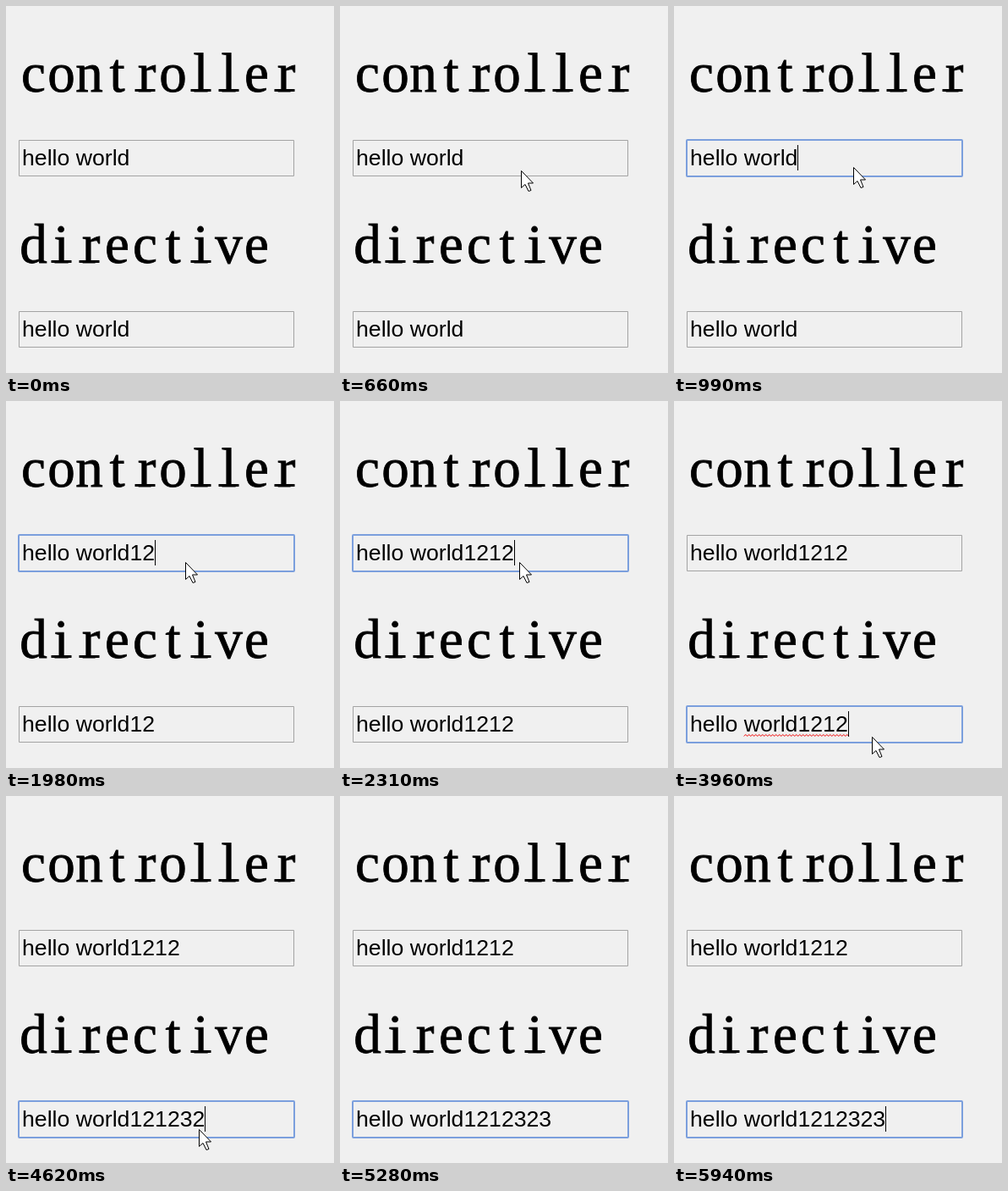
These frames come from a looping animation (388 px wide and 433 px high, 6270 ms). An HTML page with a canvas:

```html
<!DOCTYPE html>
<html lang="en">
<head>
<meta charset="utf-8">
<title>Two linked inputs</title>
<style>
  html, body { margin: 0; width: 100%; height: 100%; overflow: hidden; background: #f0f0f0; }
  canvas { display: block; }
</style>
</head>
<body>
<canvas id="stage" width="388" height="433"></canvas>
<script>
const ctx = document.getElementById('stage').getContext('2d');
const STEP = 330, STEPS = 19;
const FIELD_GAP = 202, TEXT_X = 19, CELL = 33, HEADING_Y = 101;

// Each entry is [first step, value]; the value holds until the next entry.
const pointer = [[0, null], [1, [299, 206]], [2, [214, 194]], [3, [212, 190]], [11, [247, 303]],
  [12, [234, 396]], [13, [232, 395]], [14, [228, 393]], [15, [217, 389]], [16, null]];
const focus = [[0, -1], [3, 0], [12, 1]];
const caret = [[0, false], [3, true], [8, false], [10, true], [16, false], [18, true]];
const topDigits = [[0, ''], [4, '1'], [6, '12'], [7, '1212']];
const extraDigits = [[0, ''], [13, '3'], [14, '32'], [15, '323']];
const SPELLCHECK_STEP = 12;

const at = (track, step) => track.filter(([start]) => start <= step).pop()[1];

// Monospaced serif lettering; narrow letters get a wide foot.
function heading(text, baseline) {
  ctx.font = '65px "Liberation Serif", "Times New Roman", serif';
  ctx.textAlign = 'center';
  ctx.fillStyle = ctx.strokeStyle = '#000';
  ctx.lineWidth = 0.8;
  [...text].forEach((letter, i) => {
    const x = 32.5 + CELL * i;
    const shift = letter === 'r' ? 2 : 0;
    ctx.fillText(letter, x + shift, baseline);
    ctx.strokeText(letter, x + shift, baseline);
    if ('lir'.includes(letter)) ctx.fillRect(x - 12, baseline - 3, 24, 3);
  });
}

function squiggle(x, end, y) {
  ctx.beginPath();
  ctx.moveTo(x, y + 2);
  for (let up = true; x < end; up = !up) ctx.lineTo(x += 2, up ? y : y + 2);
  ctx.strokeStyle = '#f00000';
  ctx.lineWidth = 1;
  ctx.stroke();
}

function field(index, text, focused, showCaret, misspelled) {
  ctx.save();
  ctx.translate(0, index * FIELD_GAP);
  ctx.beginPath();
  if (focused) {
    ctx.roundRect(15, 158, 326, 43, 1);
    ctx.strokeStyle = '#7b9fdd';
    ctx.lineWidth = 2;
  } else {
    ctx.rect(15.5, 158.5, 325, 42);
    ctx.strokeStyle = '#a3a3a3';
    ctx.lineWidth = 1;
  }
  ctx.stroke();
  ctx.font = '26.667px "Liberation Sans", Arial, sans-serif';
  ctx.textAlign = 'left';
  ctx.fillStyle = '#000';
  ctx.fillText(text, TEXT_X, 188);
  const end = Math.round(TEXT_X + ctx.measureText(text).width);
  if (misspelled) squiggle(TEXT_X + ctx.measureText('hello ').width, end - 1, 191.5);
  if (focused && showCaret) ctx.fillRect(end, 164, 1, 30);
  ctx.restore();
}

function arrow([x, y]) {
  ctx.save();
  ctx.translate(x + .5, y + .5);
  const outline = new Path2D('M0 0V20L4.5 16L8.5 24L11.5 23L8 14.5H14Z');
  ctx.fillStyle = '#fff';
  ctx.fill(outline);
  ctx.strokeStyle = '#000';
  ctx.lineWidth = 1;
  ctx.stroke(outline);
  ctx.restore();
}

function draw(now) {
  const step = Math.floor(now / STEP) % STEPS;
  ctx.fillStyle = '#f0f0f0';
  ctx.fillRect(0, 0, 388, 433);
  heading('controller', HEADING_Y);
  heading('directive', HEADING_Y + FIELD_GAP);

  const topText = 'hello world' + at(topDigits, step);
  const focused = at(focus, step), showCaret = at(caret, step);
  field(0, topText, focused === 0, showCaret, false);
  field(1, topText + at(extraDigits, step), focused === 1, showCaret, step === SPELLCHECK_STEP);

  const position = at(pointer, step);
  if (position) arrow(position);
  requestAnimationFrame(draw);
}
draw(0);
</script>
</body>
</html>
```
